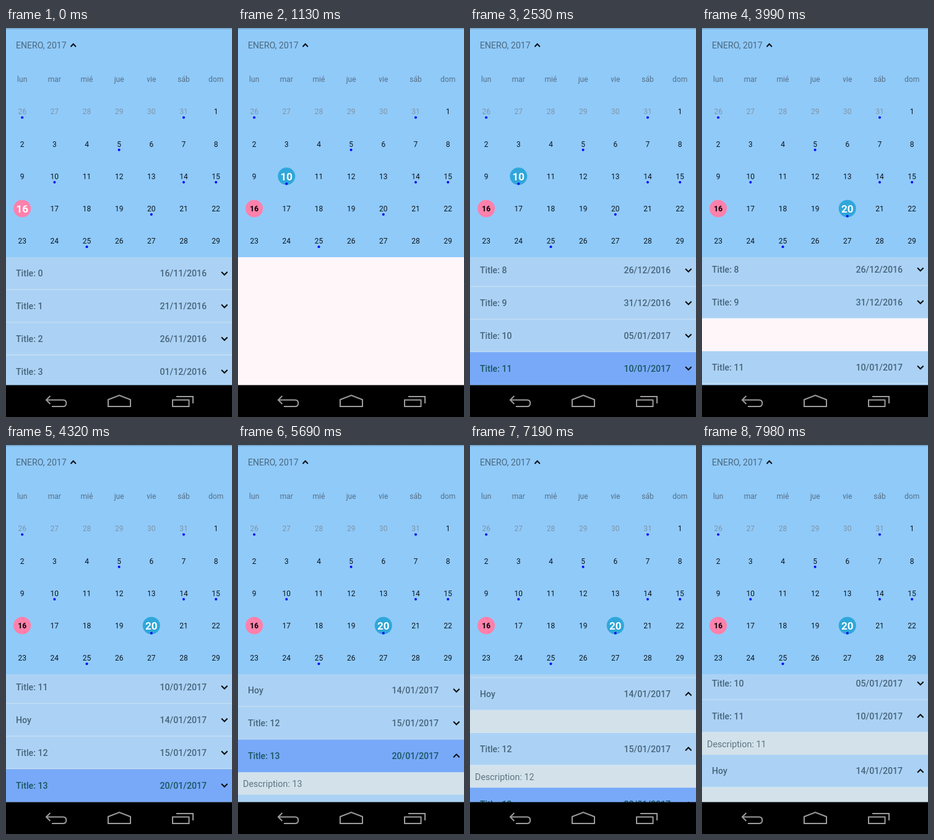
An HTML page that plays this animation: 365x628 px, repeating every 8000 ms.

```html
<!DOCTYPE html>
<html lang="es">
<head>
<meta charset="utf-8">
<title>Calendario</title>
<style>
  html, body { margin: 0; width: 100%; height: 100%; overflow: hidden; background: #90caf9; }
  svg { display: block; font-family: Roboto, Arial, sans-serif; }
  .mid { text-anchor: middle; }
  .end { text-anchor: end; }
  .day { font-size: 12px; fill: #0b1620; }
  .other { fill: #7d95a8; }
  .today { font-weight: 700; fill: #000; }
  .picked { font-size: 17px; font-weight: 700; fill: #fff; }
  .week { font-size: 12px; fill: #557086; }
  .month { font-size: 14.1px; fill: #4a6881; }
  .row text { font-size: 14.2px; font-weight: 500; fill: #48647c; }
  .row.on text { fill: #185660; }
  .row text.desc { font-size: 14.3px; font-weight: 400; fill: #5d7482; }
</style>
</head>
<body>
<svg id="stage" width="365" height="628" viewBox="0 0 365 628">
  <defs>
    <linearGradient id="shade" x2="0" y2="1">
      <stop offset="0" stop-color="#6f9dc2"/>
      <stop offset="1" stop-color="#90caf9"/>
    </linearGradient>
  </defs>
  <rect width="365" height="628" fill="#90caf9"/>
  <g id="pages"></g>
  <text id="month" class="month" x="16" y="33"></text>
  <path id="caret" d="M-4.2 2.2L0-2.2L4.2 2.2" fill="none" stroke="#0a0f14" stroke-width="2"/>
  <rect width="365" height="3" fill="url(#shade)"/>
  <svg id="list" y="370" width="365" height="207" overflow="hidden">
    <rect width="365" height="207" fill="#fff6fa"/>
  </svg>
  <rect y="576.5" width="365" height="51.5"/>
  <g fill="none" stroke="#9c9c9c" stroke-width="2">
    <path d="M71.5 594L65 600.5L71.5 607M65.5 600.5H92Q97.300 600.5 97.300 605.8T92 611H74"/>
    <path d="M165 611V600L183 593L201 600V611Z"/>
    <path d="M269 600.500H295.500V611H269ZM275 595H302V606"/>
  </g>
</svg>
<script>
const LOOP = 8000, DAY = 864e5, ROW = 52.75, DESC = 36, WIDTH = 365;
const $ = id => document.getElementById(id);

function add(parent, tag, attrs, text) {
  const el = document.createElementNS('http://www.w3.org/2000/svg', tag);
  for (const k in attrs) el.setAttribute(k, attrs[k]);
  if (text !== undefined) el.textContent = text;
  return parent.appendChild(el);
}

// Progress in n equal steps: the first at time a, the last at time b.
const steps = (t, a, b, n) => t < a ? 0
  : Math.min(1, (Math.floor((t - a) / (b - a) * (n - 1) + 1e-6) + 1) / n);
const easeOut = p => 1 - (1 - p) * (1 - p);
const easeInOut = p => (1 - Math.cos(Math.PI * p)) / 2;

// Calendar
const FIRST_EVENT = Date.UTC(2016, 10, 16), TODAY = Date.UTC(2017, 0, 16);
const HOY = Date.UTC(2017, 0, 14);
const colX = c => 26.2 + 52.15 * c;
const rowY = r => 135.2 + 52.2 * r;
const hasEvent = d => d === HOY || (d - FIRST_EVENT) % (5 * DAY) === 0;
const pages = $('pages');
const cells = {};

function buildPage(month, start, x) {
  const page = add(pages, 'g', { transform: `translate(${x})` });
  ['lun', 'mar', 'mié', 'jue', 'vie', 'sáb', 'dom'].forEach((name, c) =>
    add(page, 'text', { class: 'mid week', x: colX(c), y: 87.3 }, name));
  for (let i = 0; i < 35; i++) {
    const date = new Date(start + i * DAY), own = date.getUTCMonth() === month;
    const today = +date === TODAY;
    const g = add(page, 'g', { transform: `translate(${colX(i % 7)} ${rowY(i / 7 | 0)})` });
    const disc = add(g, 'circle', { cy: -.3, r: 14, fill: today ? '#ff80ab' : '#2fa7db' });
    const label = add(g, 'text', {}, date.getUTCDate());
    const dot = hasEvent(+date) && add(g, 'circle', { r: 2, fill: '#0000f5' });
    const ripple = add(g, 'circle', { fill: '#2fa7db', opacity: 0 });
    const setPicked = on => {
      disc.setAttribute('opacity', on || today ? 1 : 0);
      label.setAttribute('class', 'mid day' + (own ? '' : ' other') + (today ? ' today' : '') + (on ? ' picked' : ''));
      label.setAttribute('y', on ? 6 : 4.2);
      if (dot) dot.setAttribute('cy', on ? 12 : 9.3);
    };
    setPicked(false);
    if (own && month === 0) cells[date.getUTCDate()] = { setPicked, ripple };
  }
}
buildPage(0, Date.UTC(2016, 11, 26), 0);
buildPage(1, Date.UTC(2017, 0, 30), WIDTH);

const taps = [[-1000, 16], [800, 10], [3140, 5], [3740, 20]];
let picked = 0;

function drawCalendar(t) {
  const [at, day] = taps.filter(tap => tap[0] <= t).pop();
  if (day !== picked) {
    if (picked) {
      cells[picked].setPicked(false);
      cells[picked].ripple.setAttribute('opacity', 0);
    }
    cells[day].setPicked(true);
    picked = day;
  }
  const p = Math.min(1, (t - at) / 250), ripple = cells[day].ripple;
  ripple.setAttribute('r', 14 + 13 * easeOut(p));
  ripple.setAttribute('opacity', .3 * (1 - p));

  const turn = easeInOut(steps(t, 1460, 1830, 8)) - easeInOut(steps(t, 2150, 2530, 8));
  pages.setAttribute('transform', `translate(${-WIDTH * turn})`);
  const name = turn > .5 ? 'FEBRERO, 2017' : 'ENERO, 2017';
  if ($('month').textContent !== name) $('month').textContent = name;
  $('caret').setAttribute('transform', `translate(${$('month').getComputedTextLength() + 27} 28)`);
}

// Event list
const HOY_ROW = 12;
const two = n => String(n).padStart(2, '0');
const rows = Array.from({ length: 18 }, (_, i) => {
  const hoy = i === HOY_ROW, n = i > HOY_ROW ? i - 1 : i;
  const d = new Date(hoy ? HOY : FIRST_EVENT + n * 5 * DAY);
  const date = `${two(d.getUTCDate())}/${two(d.getUTCMonth() + 1)}/${d.getUTCFullYear()}`;
  const g = add($('list'), 'g', { class: 'row' });
  const box = add(g, 'svg', { y: ROW, width: WIDTH, height: 0, overflow: 'hidden' });
  add(box, 'rect', { width: WIDTH, height: DESC, fill: '#d3e2ea' });
  add(box, 'text', { class: 'desc', x: 8, y: 23.8 }, hoy ? '' : `Description: ${n}`);
  add(g, 'rect', { width: WIDTH, height: ROW, fill: '#abd2f4' });
  add(g, 'rect', { y: ROW - 1, width: WIDTH, height: 1, fill: '#cfe4f5' });
  const glow = add(g, 'rect', { width: WIDTH, height: ROW, fill: '#78a9f9' });
  add(g, 'text', { x: 16, y: 31.4 }, hoy ? 'Hoy' : `Title: ${n}`);
  add(g, 'text', { class: 'end', x: 324.2, y: 31.4 }, date);
  const arrow = add(g, 'path', { d: 'M-4.8-2.500L0 2.300L4.8-2.500', fill: 'none', stroke: '#060a0e', 'stroke-width': 2 });
  return { g, box, glow, arrow };
});

const expands = { 14: [5120, 5390], 13: [6230, 6470], 12: [6840, 7110], 11: [7750, 7980] };

// Each entry: start, end, steps, distance, easing.
const linear = p => p;
const scrolls = [
  [1100, 1101, 1, 427, linear],
  [3990, 3991, 1, 1.5, linear],
  [4040, 4320, 6, 156.75, easeOut],
  [5430, 5690, 6, 47.75, linear],
  [5735, 5940, 5, 26.1, easeOut],
  [7150, 7400, 7, -120.2, easeOut]
];

function drawList(t) {
  const scroll = scrolls.reduce((s, [a, b, n, by, ease]) => s + by * ease(steps(t, a, b, n)), 0);
  const swap = steps(t, 3140, 3410, 7);
  const glows = { 11: t < 1100 ? 0 : 1 - swap, 10: t < 4040 ? swap : 0, 14: t < 3740 ? 0 : 1 };
  const fade = t < 1100 ? 1 - steps(t, 800, 1085, 7) : steps(t, 1170, 1250, 3);
  const gone = t < 4330 ? steps(t, 3740, 3990, 6) : 0;
  let y = -scroll;
  rows.forEach((row, i) => {
    const open = expands[i] ? steps(t, ...expands[i], 7) : 0, glow = glows[i] || 0;
    row.g.setAttribute('transform', `translate(0 ${y})`);
    row.g.setAttribute('opacity', i === 10 ? fade * (1 - gone) : fade);
    row.g.setAttribute('class', glow > .5 ? 'row on' : 'row');
    row.glow.setAttribute('opacity', glow);
    row.box.setAttribute('height', DESC * open);
    row.arrow.setAttribute('transform', `translate(352.8 26.2) rotate(${180 * open})`);
    y += ROW + DESC * open;
  });
}

const begin = performance.now();
function frame() {
  const t = (performance.now() - begin) % LOOP;
  drawCalendar(t);
  drawList(t);
  requestAnimationFrame(frame);
}
frame();
</script>
</body>
</html>
```
